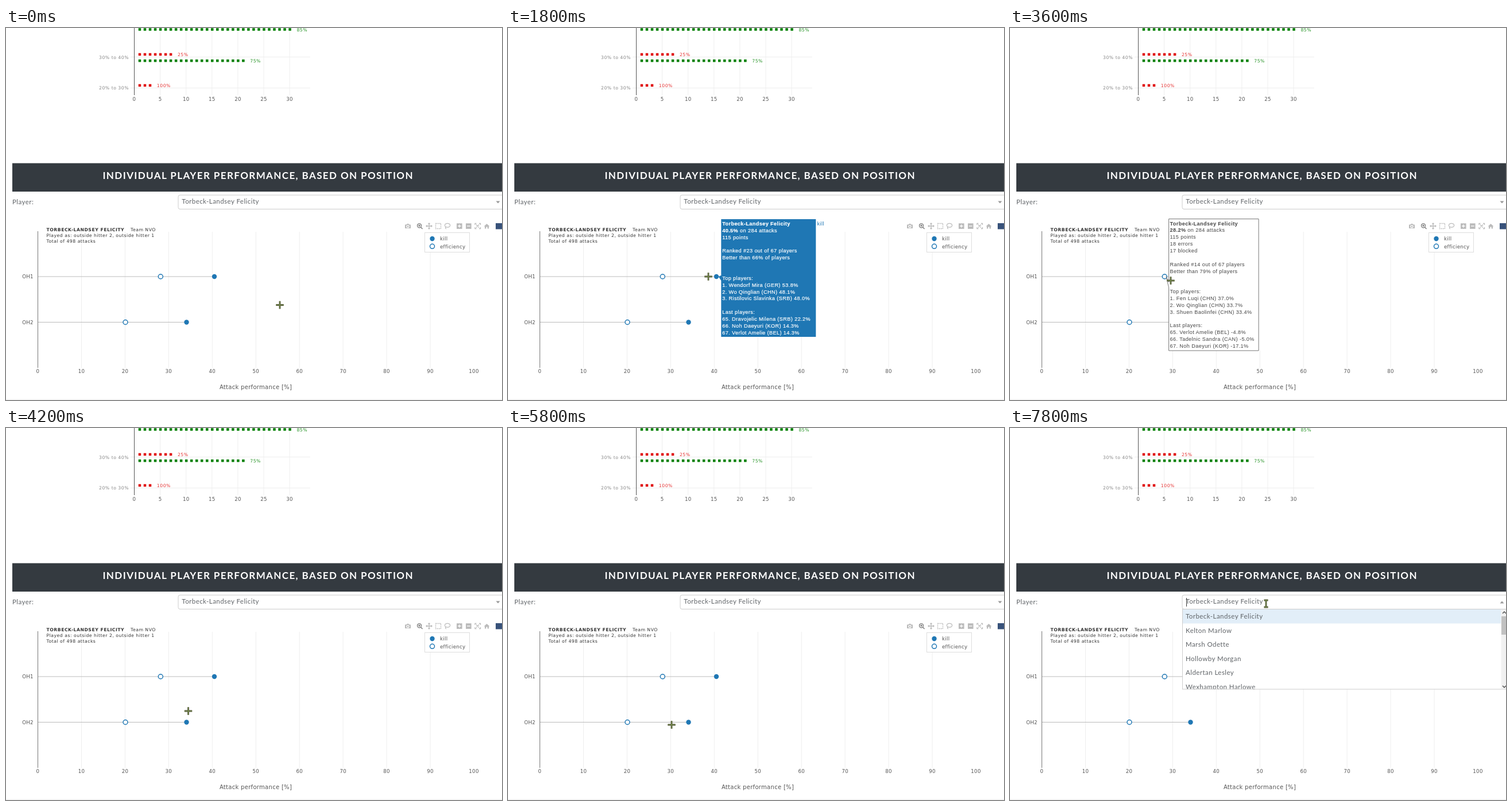
Animation, 864 px wide and 648 px high, one loop 8 s. Source, as an HTML page:

```html
<!DOCTYPE html>
<html lang="en">
<head>
<meta charset="utf-8">
<title>Player performance</title>
<style>
html, body { margin: 0; width: 100%; height: 100%; overflow: hidden; background: #fff; }
svg { display: block; width: 864px; height: 648px; }
text { font-family: "DejaVu Sans", sans-serif; font-size: 8.6px; letter-spacing: .3px; fill: #555; white-space: pre; }
.end { text-anchor: end; }
.mid { text-anchor: middle; }
.soft, .pct, .note { font-size: 7.7px; letter-spacing: .52px; }
.soft { fill: #888; }
.note { fill: #333; }
.axis { font-size: 10px; }
.ui { font-family: Lato, sans-serif; font-size: 11.5px; letter-spacing: .45px; fill: #606468; }
.title { font: 700 17px Lato, sans-serif; letter-spacing: 1.4px; fill: #fff; }
.tip text { font-family: "Liberation Sans", Arial, sans-serif; font-size: 9.1px; letter-spacing: .42px; fill: #444; }
.tip.blue text { fill: #fff; stroke: #fff; stroke-width: .2px; }
.tip.blue .series { fill: #1f77b4; stroke: none; }
.b { font-weight: 700; }
.grid { stroke: #eee; }
.icon { fill: none; stroke: #bbb; stroke-width: 1.3; }
</style>
</head>
<body>
<svg id="stage" viewBox="0 0 864 648"></svg>
<script>
const BLUE = '#1f77b4';
const PLAYER = 'Torbeck-Landsey Felicity';
const stage = document.getElementById('stage');

const text = (x, y, s, cls = '') => `<text x="${x}" y="${y}" class="${cls}">${s}</text>`;
const line = (x1, y1, x2, y2, attrs = 'class="grid"') =>
  `<line x1="${x1}" y1="${y1}" x2="${x2}" y2="${y2}" ${attrs}/>`;
const rect = (x, y, w, h, attrs) => `<rect x="${x}" y="${y}" width="${w}" height="${h}" ${attrs}/>`;
const path = (d, attrs = '') => `<path d="${d}" ${attrs}/>`;
const range = (n, fn) => Array.from({ length: n }, (_, i) => fn(i)).join('');
const dot = (x, y, full) =>
  `<circle cx="${x}" cy="${y}" r="${full ? 4.2 : 4}" fill="${full ? BLUE : '#fff'}" stroke="${BLUE}" stroke-width="${full ? 0 : 1.5}"/>`;

// Row of n small squares followed by its percentage
function squares(y, n, color, label) {
  const step = 9.02, size = 4.5, x = 230.7;
  return line(x, y, x + (n - 1) * step + size, y,
    `stroke="${color}" stroke-width="${size}" stroke-dasharray="${size} ${step - size}"`) +
    `<text x="${235.8 + n * step}" y="${y + 3}" class="pct" style="fill:${color}" opacity=".85">${label}</text>`;
}

function upperChart() {
  return range(6, i => line(268.6 + i * 45.1, 0, 268.6 + i * 45.1, 117)) +
    line(217, 50.5, 530, 50.5) + line(217, 104.5, 530, 104.5) +
    line(223.5, 0, 223.5, 117, 'stroke="#555"') +
    range(7, i => text(223.5 + i * 45.1, 126.6, i * 5, 'mid')) +
    text(214, 53.5, '30% to 40%', 'end soft') + text(214, 107.3, '20% to 30%', 'end soft') +
    squares(2.6, 30, '#008000', '85%') + squares(46, 7, '#e01010', '25%') +
    squares(57, 21, '#008000', '75%') + squares(100, 3, '#e01010', '100%');
}

function toolbar() {
  const icons =
    path('M695 342.5h2.5l1-1.5h3l1 1.5h2.5v6.5h-10z', 'fill="#bbb" stroke="none"') +
    '<circle cx="700" cy="345.7" r="2" fill="#bbb" stroke="#fff"/>' +
    path('M737 340v10M732 345h10M735.5 341.5l1.5-1.5 1.5 1.5M735.5 348.5l1.5 1.5 1.5-1.5M733.5 343.5l-1.5 1.5 1.5 1.5M740.5 343.5l1.5 1.5-1.5 1.5') +
    rect(748.5, 340.5, 9, 9, 'stroke-dasharray="2 1.2"') +
    '<ellipse cx="769" cy="343.7" rx="4.6" ry="3.4"/>' + path('M766 346.5q-1.5 2 1 3.5') +
    rect(785, 340.3, 9.6, 9.6, 'fill="#bbb" stroke="none"') + path('M787 345h5.6M789.8 342.2v5.6', 'stroke="#fff"') +
    rect(801, 340.3, 9.6, 9.6, 'fill="#bbb" stroke="none"') + path('M803 345h5.6', 'stroke="#fff"') +
    path('M817 343v-2.5h2.5M824 340.5h2.5v2.5M826.5 347v2.5h-2.5M819.5 349.5h-2.5v-2.5M819 342.5l5 5M824 342.5l-5 5') +
    path('M832.5 345.5l5-4.5 5 4.5h-1.5v4h-2.3v-3h-2.4v3h-2.3v-4z', 'fill="#bbb" stroke="none"') +
    '<g stroke="#777"><circle cx="720" cy="344.3" r="3.5"/>' + path('M722.5 347l3 3M718.2 344.3h3.6M720 342.5v3.6') + '</g>';
  return `<g class="icon">${icons}</g>` + rect(853, 340, 11, 10.5, 'fill="#38527a"');
}

function lowerChart() {
  const px = v => 55.5 + v * 7.595;
  return range(9, i => line(px(i * 10 + 10), 355, px(i * 10 + 10), 592)) +
    line(55.5, 433, 363, 433, 'stroke="#bbb"') + line(55.5, 512.5, 314.5, 512.5, 'stroke="#bbb"') +
    line(55.5, 354, 55.5, 592, 'stroke="#777"') +
    range(11, i => text(px(i * 10), 601.1, i * 10, 'mid')) +
    text(47.8, 436.3, 'OH1', 'end') + text(47.8, 515.7, 'OH2', 'end') +
    text(435, 628.5, 'Attack performance [%]', 'mid axis') +
    dot(269.3, 433, 0) + dot(363, 433, 1) + dot(208, 512.5, 0) + dot(314.5, 512.5, 1) +
    text(70.5, 353.6, PLAYER.toUpperCase(), 'note b') +
    text(217, 353.6, 'Team NVO', 'note') +
    text(70.5, 363.7, 'Played as: outside hitter 2, outside hitter 1', 'note') +
    text(70.5, 373.9, 'Total of 498 attacks', 'note') +
    rect(729.5, 356.5, 78, 34, 'fill="#fff" stroke="#ddd"') +
    dot(742.5, 367, 1) + dot(742.5, 380.3, 0) +
    text(756, 370.2, 'kill') + text(756, 383.5, 'efficiency') + toolbar();
}

function page() {
  return rect(0, 0, 864, 648, 'fill="#fff"') + upperChart() +
    rect(11, 235.5, 853, 49.5, 'fill="#343a40"') +
    text(439.2, 263.3, 'INDIVIDUAL PLAYER PERFORMANCE, BASED ON POSITION', 'title mid') +
    text(11, 306.5, 'Player:', 'ui') +
    rect(300, 291, 570, 24.5, 'rx="3" fill="#fff" stroke="#ccc"') +
    text(306.3, 306.3, PLAYER, 'ui') +
    path('M853.5 301.5h7l-3.5 4z', 'id="arrow" fill="#999"') +
    lowerChart() + line(0, 647, 864, 647, 'stroke="#eee"');
}

// Hover label: box, pointer to the marker, and a pale name box to its right
function tip(id, blue, x, y, w, h, markY, rows) {
  const mid = y + h / 2, nameW = blue ? 16 : 48;
  const box = `M${x - 4.6} ${markY}L${x} ${mid + 4.6}V${y + h}H${x + w}V${y}H${x}V${mid - 4.6}Z`;
  const body = rows.split('|').map((row, i) => {
    const s = i === 1 ? row.replace(/^\S+/, '<tspan class="b">$&</tspan>') : row;
    return s && text(x + 1.9, (y + 11 + i * 11.85).toFixed(2), s, i ? '' : 'b');
  }).join('');
  return `<g id="${id}" class="tip ${blue ? 'blue' : ''}">` +
    rect(x + w, y, nameW, h, 'fill="#fff" fill-opacity=".8"') +
    path(box, blue ? `fill="${BLUE}"` : 'fill="#fff" stroke="#777"') +
    (blue ? text(x + w + 2.3, y + 11, 'kill', 'series') : '') + body + '</g>';
}

const tips =
  tip('kill1', true, 371.3, 333, 165, 205, 433, `${PLAYER}|40.5% on 284 attacks|115 points||Ranked #23 out of 67 players|Better than 66% of players|||Top players:|1. Wendorf Mira (GER) 53.8%|2. Wo Qinglian (CHN) 48.1%|3. Ristilovic Slavinka (SRB) 48.0%||Last players:|65. Dravojelic Milena (SRB) 22.2%|66. Noh Daeyuri (KOR) 14.3%|67. Verlot Amelie (BEL) 14.3%`) +
  tip('eff1', false, 276.6, 332.6, 156.5, 229.4, 433, `${PLAYER}|28.2% on 284 attacks|115 points|18 errors|17 blocked||Ranked #14 out of 67 players|Better than 79% of players|||Top players:|1. Fen Luqi (CHN) 37.0%|2. Wo Qinglian (CHN) 33.7%|3. Shuen Baolinfei (CHN) 33.4%||Last players:|65. Verlot Amelie (BEL) -4.8%|66. Tadelnic Sandra (CAN) -5.0%|67. Noh Daeyuri (KOR) -17.1%`) +
  tip('kill2', true, 322.6, 410, 178.5, 205, 512.5, `${PLAYER}|34.1% on 214 attacks|73 points||Ranked #44 out of 73 players|Better than 40% of players|||Top players:|1. Torun Eldil (TUR) 59.4%|2. Wo Qinglian (CHN) 50.6%|3. Costarilli Filomelita (BRA) 50.0%||Last players:|71. Sorapi Wanthida (THA) 13.9%|72. Zelenovac Tamira (SRB) 13.3%|73. Thamrit Kalipattira (THA) 10.0%`) +
  tip('eff2', false, 215.5, 397.8, 179.2, 229.4, 512.5, `${PLAYER}|20.1% on 214 attacks|73 points|17 errors|13 blocked||Ranked #39 out of 73 players|Better than 47% of players|||Top players:|1. Torun Eldil (TUR) 46.9%|2. Costarilli Filomelita (BRA) 45.0%|3. Wo Qinglian (CHN) 39.7%||Last players:|71. Belmontes Alisa (ARG) -12.5%|72. Morovkina Alina (RUS) -15.8%|73. Thamrit Kalipattira (THA) -20.0%`);

function menu() {
  const names = [PLAYER, 'Kelton Marlow', 'Marsh Odette', 'Hollowby Morgan', 'Aldertan Lesley', 'Wexhampton Harlowe'];
  return '<clipPath id="list"><rect x="300" y="316" width="564" height="138.5"/></clipPath><g id="menu">' +
    rect(300.5, 315.5, 570, 139.5, 'fill="#fff" stroke="#ccc"') +
    rect(301, 316, 554.5, 24.5, 'fill="#e2eef8"') +
    `<g clip-path="url(#list)">${range(6, i => text(306, 332 + i * 24.55, names[i], 'ui'))}</g>` +
    rect(855.5, 316, 9, 138.5, 'fill="#f1f1f1"') + rect(856, 328, 8, 32, 'fill="#c1c1c1"') +
    path('M858 323l3-3 3 3M858 449l3 3 3-3', 'fill="none" stroke="#555" stroke-width="1.5"') +
    line(307.5, 296, 307.5, 311, 'stroke="#333"') + '</g>';
}

const shape = (id, d) => `<g id="${id}" fill="none">` +
  path(d, 'stroke="#4b4a36" stroke-width="2.8"') + path(d, 'stroke="#7c9a4c" stroke-width="1"') + '</g>';

stage.innerHTML = page() + tips + menu() + '<g id="cursor">' +
  shape('cross', 'M-6.7 0H6.7M0-6.7V6.7') + shape('beam', 'M-3.5-6H3.5M0-6V6M-3.5 6H3.5') + '</g>';

// time, cursor x, cursor y, visible hover label
const steps = [
  [0, 477, 482.5], [200, 455, 466], [400, 415, 446], [600, 372, 434, 'kill1'],
  [800, 333, 431], [1000, 352, 433, 'kill1'], [1200, 364, 433, 'kill1'],
  [1600, 360, 433, 'kill1'], [1800, 349, 433, 'kill1'], [2000, 315, 433],
  [2200, 284, 433, 'eff1'], [2400, 273.5, 433, 'eff1'],
  [3600, 280, 440, 'eff1'], [3800, 297, 458], [4000, 312, 480], [4200, 317.5, 493],
  [4400, 318, 506, 'kill2'], [4600, 318, 516, 'kill2'],
  [5600, 318, 516.5, 'kill2'], [5800, 285, 517], [6000, 237, 517], [6200, 218, 517.5, 'eff2'],
  [7000, 218, 517.5, 'eff2'], [7200, 258, 465], [7400, 390, 345],
  [7600, 446, 306], [7800, 446, 306]
];
const el = id => document.getElementById(id);
const show = (id, on) => { el(id).style.display = on ? '' : 'none'; };

function draw(now) {
  const t = now % 8000;
  const [start, x, y, label] = steps.filter(s => s[0] <= t).pop();
  const open = start === 7800, typing = start >= 7600;
  el('cursor').setAttribute('transform', `translate(${x} ${y})`);
  ['kill1', 'eff1', 'kill2', 'eff2'].forEach(id => show(id, id === label));
  show('menu', open);
  show('beam', typing);
  show('cross', !typing);
  el('arrow').setAttribute('d', open ? 'M853.5 305.5h7l-3.5-4z' : 'M853.5 301.5h7l-3.5 4z');
}

function frame() {
  draw(performance.now());
  requestAnimationFrame(frame);
}
draw(0);
requestAnimationFrame(frame);
</script>
</body>
</html>
```
